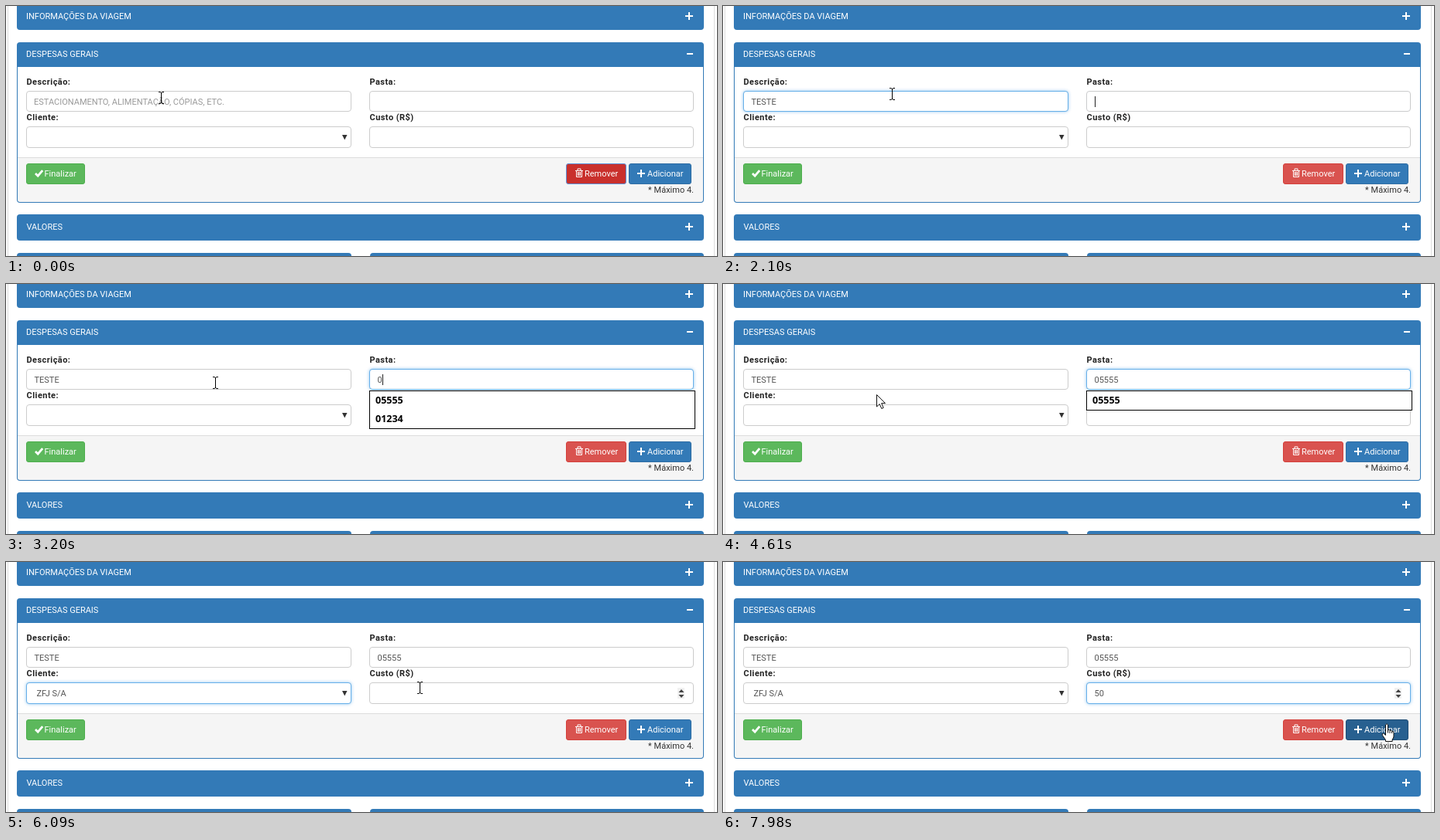
Animation of 918 by 324 pixels, one loop 8000 ms. Source, as an HTML page:

```html
<!DOCTYPE html>
<html lang="pt-BR">
<head>
<meta charset="utf-8">
<title>Despesas</title>
<style>
  html, body { margin: 0; width: 100%; height: 100%; overflow: hidden; background: #fff; }
  svg { display: block; width: 918px; height: 324px; }
  text { font: 11px Roboto, Arial, sans-serif; fill: #555; white-space: pre; }
  .blue { fill: #337ab7; }
  .white, .white text, .hot { fill: #fff; }
  .label text { font-weight: bold; fill: #222; letter-spacing: .45px; }
  .field rect { fill: #fff; stroke: #ccc; }
  .focus rect { fill: #fff; stroke: #66afe9; filter: drop-shadow(0 0 2px rgba(102, 175, 233, .7)); }
  .hint { fill: #999; }
  .popup rect { fill: #fff; stroke: #000; }
  .popup text { font: bold 12.5px "Open Sans", "Noto Sans", sans-serif; fill: #000; }
  .list > rect:first-child { fill: #fff; stroke: #6f93cf; }
  .caret { fill: #222; }
  .line { fill: none; stroke: #fff; stroke-width: 2; }
  .cursor path { fill: #fff; stroke: #111; stroke-linejoin: round; }
  #beam path { fill: none; stroke: #000; }
</style>
</head>
<body>
<svg viewBox="0 0 918 324">
  <path d="M2.5 0V324M914.5 0V324" stroke="#ddd"/>

  <g class="blue">
    <rect x="14" y="-10" width="887" height="41" rx="4"/>
    <rect x="14" y="47" width="887" height="208" rx="4"/>
    <rect x="14" y="270" width="887" height="34" rx="4"/>
    <rect x="14" y="320" width="432" height="30" rx="4"/>
    <rect x="470" y="320" width="431" height="30" rx="4"/>
  </g>
  <rect x="15" y="79" width="885" height="120" fill="#fff"/>
  <path d="M15 196H900V251a3 3 0 0 1-3 3H18a3 3 0 0 1-3-3Z" fill="#f5f5f5"/>
  <path d="M15 196.5H900" stroke="#ddd"/>

  <g class="white">
    <text x="26" y="17">INFORMAÇÕES DA VIAGEM</text>
    <text x="26" y="66">DESPESAS GERAIS</text>
    <text x="26.5" y="290">VALORES</text>
  </g>
  <path class="line" d="M877 13h10M882 8v10M879 62h8M877 286h10M882 281v10"/>

  <g class="label">
    <text x="26.5" y="102">Descrição:</text>
    <text x="469.5" y="102">Pasta:</text>
    <text x="26.5" y="148">Cliente:</text>
    <text x="469.5" y="148">Custo (R$)</text>
  </g>

  <g class="field">
    <rect x="26.5" y="110.5" width="419" height="26" rx="3.5"/>
    <rect x="469.5" y="110.5" width="418" height="26" rx="3.5"/>
    <rect x="26.5" y="156.5" width="419" height="27" rx="3.5"/>
    <rect x="469.5" y="156.5" width="418" height="27" rx="3.5"/>
  </g>
  <g class="focus">
    <rect id="descFocus" x="26.5" y="110.5" width="419" height="26" rx="3.5"/>
    <rect id="folderFocus" x="469.5" y="110.5" width="418" height="26" rx="3.5"/>
    <rect id="clientFocus" x="26.5" y="156.5" width="419" height="27" rx="3.5"/>
    <rect id="costFocus" x="469.5" y="156.5" width="418" height="27" rx="3.5"/>
  </g>

  <text id="hint" class="hint" x="36" y="128">ESTACIONAMENTO, ALIMENTAÇÃO, CÓPIAS, ETC.</text>
  <text id="desc" x="36.5" y="128"></text>
  <text id="folder" x="479.5" y="128"></text>
  <text id="client" x="39.5" y="174">ZFJ S/A</text>
  <text id="cost" x="479.5" y="174"></text>
  <path d="M434 167h6.5l-3.25 6.5Z" fill="#333"/>
  <g id="spinner">
    <rect x="867" y="163" width="9" height="14" fill="#f1f1f1"/>
    <path d="M868.5 169l3.5-4 3.5 4ZM868.5 172l3.5 4 3.5-4Z" fill="#444"/>
  </g>
  <rect id="descCaret" class="caret" y="117" width="1" height="14"/>
  <rect id="folderCaret" class="caret" y="117" width="1" height="14"/>
  <rect id="costCaret" class="caret" y="163" width="1" height="14"/>

  <g class="white">
    <rect x="26.5" y="204.5" width="75" height="26" rx="2.5" fill="#5cb85c" stroke="#4cae4c"/>
    <path d="M38 217l3.2 3.2 6-7" fill="none" stroke="#fff" stroke-width="2.8"/>
    <text x="49.5" y="221">Finalizar</text>

    <rect id="remove" x="723.5" y="204.5" width="77" height="26" rx="2.5"/>
    <path d="M735 213.5h10M738 213v-2h4v2M736.5 214v7.5h7V214M738.5 215v5M740 215v5M741.5 215v5" fill="none" stroke="#fff"/>
    <text x="747" y="221">Remover</text>

    <rect id="add" x="804.5" y="204.5" width="80" height="26" rx="2.5"/>
    <path class="line" d="M815 217h10M820 212v10"/>
    <text x="828" y="221">Adicionar</text>
  </g>
  <text x="888" y="242" text-anchor="end" style="fill:#333">* Máximo 4.</text>

  <g id="descPopup" class="popup"></g>
  <g id="folderPopup" class="popup"></g>

  <g id="list" class="list">
    <rect x="27.5" y="183.5" width="417" height="61"/>
    <rect id="hover" x="28" width="416" height="15" fill="#1e90ff"/>
    <text id="first" x="40" y="209">ZFJ S/A</text>
    <text x="40" y="224">GRANITOS TARUVIENSE S A GRANTARUI</text>
    <text x="40" y="239">TODOS OS CLIENTES</text>
  </g>

  <g id="cursor" class="cursor">
    <g id="beam"><path d="M-3 -7.5H-1L.5 -6.5L2 -7.5H4M.5 -7V7M-3 7.5H-1L.5 6.5L2 7.5H4"/></g>
    <g id="arrow"><path d="M.5 .5V16L4.2 12.6L6.8 18.5L9.2 17.4L6.6 11.6H11.5Z"/></g>
    <g id="hand">
      <path d="M-1.5 1Q0 -1.5 1.5 1V8Q3 6.5 4 8.5Q5.8 7.2 6.6 9.3Q9 8.8 9 11.5V16Q9 18 7.2 20V22.5H-1.5V20.5L-5.6 14.5Q-6.5 12 -4.3 12L-1.5 14.5Z"/>
      <path d="M1.5 8v3.5M4 8.5V12M6.6 9.5V12"/>
    </g>
  </g>
</svg>
<script>
const LOOP = 8000, FADE = 150;
const el = {};
document.querySelectorAll('[id]').forEach(n => el[n.id] = n);

// Pointer moves: start, end, steps, x, y
const moves = [
  [70, 70, 1, 200, 120],
  [2100, 2100, 1, 218, 114],
  [2180, 2730, 8, 270, 128],
  [4380, 4610, 4, 198, 143],
  [4690, 4930, 4, 192, 164],
  [5160, 5330, 3, 129, 204],
  [5700, 6090, 6, 534, 163],
  [7520, 7980, 7, 857, 210]
];

// Typed fields: text, key times, spans with a visible caret
const inputs = {
  desc: ['TESTE', [1330, 1400, 1550, 1710, 1780], [[620, 1100], [1330, 2100]]],
  folder: ['05555', [3200, 3360, 3510, 3740, 3910], [[2100, 2600], [3130, 4410], [4910, 5080]]],
  cost: ['50', [6890, 7020], [[6260, 6720], [6890, 7440]]]
};

const focus = {
  desc: [620, 2100], folder: [2100, 5080], client: [5080, 6260], cost: [6260, LOOP + FADE]
};

const within = (t, a, b) => t >= a && t < b;
const show = (id, on) => el[id].setAttribute('visibility', on ? 'visible' : 'hidden');
const inside = (p, x0, y0, x1, y1) => within(p.x, x0, x1) && within(p.y, y0, y1);
const paint = (id, fill, stroke) => {
  el[id].style.fill = fill;
  el[id].style.stroke = stroke;
};

function pointer(t) {
  let x = 200, y = 119;
  for (const [a, b, n, tx, ty] of moves) {
    if (t < a) break;
    const gap = n > 1 ? (b - a) / (n - 1) : 1;
    const k = Math.min(n, 1 + Math.floor((t - a) / gap + 1e-6)) / n;
    x += (tx - x) * k;
    y += (ty - y) * k;
  }
  return { x: Math.round(x), y: Math.round(y) };
}

function popup(id, x, rows) {
  const key = rows.join();
  if (el[id].dataset.key === key) return;
  el[id].dataset.key = key;
  const box = `<rect x="${x + .5}" y="138.5" width="420" height="${rows.length * 24 + 1}"/>`;
  el[id].innerHTML = rows.length
    ? box + rows.map((r, i) => `<text x="${x + 8}" y="${155 + i * 24}">${r}</text>`).join('')
    : '';
}

function drawInputs(t) {
  for (const id in inputs) {
    const [text, keys, carets] = inputs[id];
    const typed = text.slice(0, keys.filter(k => t >= k).length);
    if (el[id].textContent !== typed) el[id].textContent = typed;
    const end = +el[id].getAttribute('x') + (typed ? el[id].getComputedTextLength() : 0);
    el[id + 'Caret'].setAttribute('x', Math.floor(end + .5));
    show(id + 'Caret', carets.some(([a, b]) => within(t, a, b)));
  }
  for (const id in focus) {
    const [a, b] = focus[id];
    const level = Math.min((t - a) / FADE, 1 - (t - b) / FADE);
    el[id + 'Focus'].style.opacity = Math.max(0, Math.min(1, level));
  }
  show('hint', t < 1330);
  show('client', t >= 5630);
}

function drawLists(t, p) {
  popup('descPopup', 27, within(t, 1330, 2100) ? ['TESTE', 'TESTE 1', 'TESTE 2', 'TESTE 3'] : []);
  popup('folderPopup', 469, !within(t, 3200, 5080) ? [] : t < 3360 ? ['05555', '01234'] : ['05555']);
  const open = within(t, 5160, 5630), hot = p.y >= 198;
  show('list', open);
  el.hover.setAttribute('y', hot ? 198 : 184);
  el.hover.setAttribute('height', hot ? 15 : 14);
  el.first.setAttribute('class', hot ? 'hot' : '');
}

function draw(t) {
  const p = pointer(t);
  drawInputs(t);
  drawLists(t, p);

  const overCost = inside(p, 470, 156, 888, 184);
  const overText = overCost || inside(p, 27, 110, 446, 137) || inside(p, 470, 110, 888, 137);
  const overAdd = inside(p, 804, 204, 885, 231);
  show('spinner', overCost || t >= 6260);
  if (t < 620) paint('remove', '#c9302c', '#5b8fd6');
  else paint('remove', '#d9534f', '#d43f3a');
  if (overAdd) paint('add', '#286090', '#204d74');
  else paint('add', '#337ab7', '#2e6da4');

  show('beam', overText);
  show('hand', overAdd);
  show('arrow', !overText && !overAdd);
  el.cursor.setAttribute('transform', `translate(${p.x} ${p.y})`);
}

const start = performance.now();
function tick() {
  draw((performance.now() - start) % LOOP);
  requestAnimationFrame(tick);
}
tick();
</script>
</body>
</html>
```
